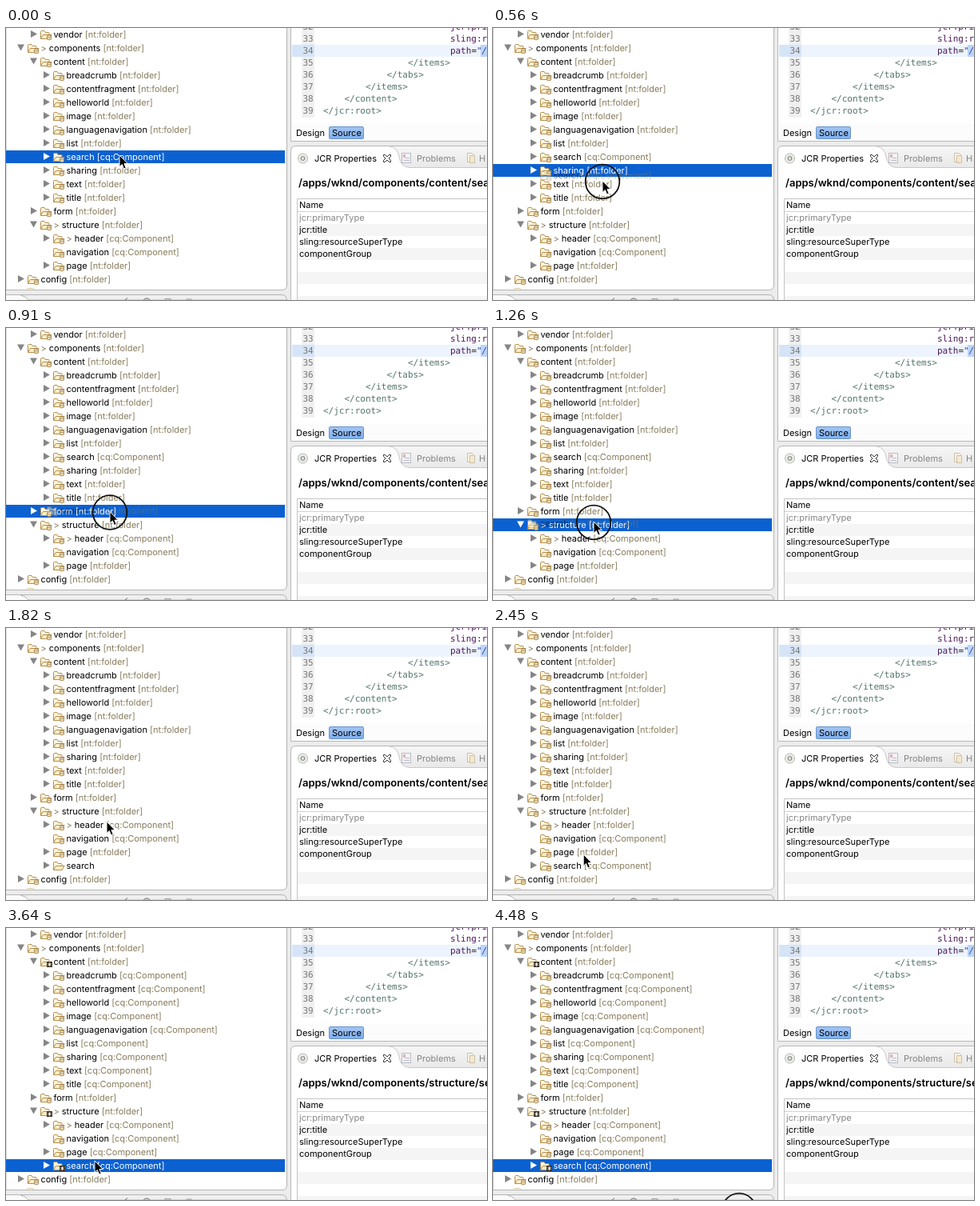
Write an HTML page that moves like this. It is 602 px wide and 340 px high and loops after 4.55 s.

```html
<!DOCTYPE html>
<html lang="en">
<head>
<meta charset="utf-8">
<title>Moving a component in the tree</title>
<style>
html, body { margin: 0; width: 100%; height: 100%; overflow: hidden; background: #ececec; }
svg { display: block; width: 602px; height: 340px; }
text { font: 11px Inter, "Open Sans", sans-serif; fill: #000; text-rendering: geometricPrecision; }
.type { fill: #877c5c; }
.on text, .on .type { fill: #fff; }
.on .arrow { fill: #fff; }
.arrow { fill: #858585; }
.code text { font: 11px "DejaVu Sans Mono", monospace; fill: #54756f; white-space: pre; }
.code .num { fill: #777; }
.code .attr { fill: #4e1a5c; }
.code .str { fill: #3347b5; font-style: italic; }
.dim { fill: #858585; }
#title { font-size: 13px; font-weight: 600; }
</style>
</head>
<body>
<svg viewBox="0 0 602 340" xmlns="http://www.w3.org/2000/svg">
  <defs>
    <linearGradient id="bar" x2="0" y2="1">
      <stop stop-color="#f6f6f6"/><stop offset="1" stop-color="#e9e9e9"/>
    </linearGradient>
    <linearGradient id="btn" x2="0" y2="1">
      <stop stop-color="#a3c5f3"/><stop offset="1" stop-color="#7dafef"/>
    </linearGradient>
    <g id="folder" stroke-width="1" stroke-linejoin="round">
      <path d="M1.5 11.5V2.500q0-1 1-1H6l1.200 2H11q1 0 1 1V6" fill="#fdf6e2" stroke="#b58f4f"/>
      <path d="M1.500 11.500L4.300 6.500H15l-2.800 5z" fill="#fceec6" stroke="#b58f4f"/>
    </g>
    <g id="store">
      <path d="M9.500 8.300v3.800q2.500 1.600 5 0V8.300z" fill="#ecd7a8" stroke="#9a7c48" stroke-width=".8"/>
      <ellipse cx="12" cy="8.300" rx="2.500" ry="1.100" fill="#fffaea" stroke="#9a7c48" stroke-width=".8"/>
    </g>
    <g id="dirty">
      <rect x="9" y="6" width="7" height="7" fill="#3a3226"/>
      <path d="M12.500 7v5M10.300 8.300l4.400 2.500M14.700 8.300l-4.400 2.500" stroke="#fff" stroke-width=".9"/>
    </g>
  </defs>

  <!-- tree panel -->
  <path d="M0 -1H351.500V321q0 6.500-6.500 6.500H0z" fill="#fff" stroke="#b5b5b5"/>
  <path d="M27 326.500v-1h6l2 1" stroke="#d8c49a" fill="none"/>
  <g id="tree"></g>

  <!-- bottom tab strip -->
  <path d="M0 333.500H345q6 0 6.500 6.500H0z" fill="#efefef" stroke="#b5b5b5"/>
  <path d="M0 334H18q7 1 10 6H0z" fill="#fafafa"/>
  <path d="M18 334q7 1 10 6" fill="none" stroke="#b5b5b5"/>
  <g fill="none" stroke="#666">
    <path d="M149 340l3-2.500"/>
    <circle cx="176" cy="343" r="5"/>
    <path d="M199 340v-1.500h7v1.500M226 340v-1h6v1" stroke="#999"/>
  </g>

  <!-- editor -->
  <path d="M356.500 -1V141.500H603V-1z" fill="#fff" stroke="#b9b9b9"/>
  <rect x="370" width="16" height="112" fill="#f0f0f0"/>
  <rect x="358" y="21" width="244" height="15" fill="#edf4fd"/>
  <rect x="358" y="21" width="28" height="15" fill="#d6e4f7"/>
  <rect x="594" y="21" width="8" height="15" fill="#bcd5f7"/>
  <g class="code" id="code"></g>
  <rect x="357" y="119" width="245" height="22" fill="#fcfcfc"/>
  <rect x="404.500" y="123.500" width="43" height="15" rx="1.500" fill="url(#btn)" stroke="#6a93c9"/>
  <text x="363" y="135">Design</text>
  <text x="408" y="135">Source</text>

  <!-- properties view -->
  <path d="M356.500 341V154q0-6.500 6.500-6.500H603V341z" fill="#fff" stroke="#b9b9b9"/>
  <path d="M480 148H602V174H504Q494 174 492 162T480 148" fill="url(#bar)"/>
  <path d="M480 148Q490 149 492 161T504 174.500H602" fill="none" stroke="#c9c9c9"/>
  <circle cx="371.500" cy="163" r="6" fill="#eceeea" stroke="#b3b7b0"/>
  <circle cx="371.500" cy="163" r="2.500" fill="#dcdfd9" stroke="#777d73"/>
  <text x="386" y="167">JCR Properties</text>
  <path d="M472.500 158.500h2l2.500 2.500 2.500-2.500h2v2l-2.500 2.500 2.500 2.500v2h-2l-2.500-2.500-2.500 2.500h-2v-2l2.500-2.500-2.500-2.500z" fill="#fff" stroke="#333"/>
  <g stroke="#a3a3b5" fill="#f4f4fa" opacity=".65">
    <rect x="495.500" y="156.500" width="11" height="12"/>
    <path d="M498 165.500h7M500 162.500h5" fill="none"/>
    <rect x="497" y="158" width="3" height="4" fill="#d89090" stroke="none"/>
    <path d="M577.500 156.500h6l2 2v9h-8z" stroke="#b9a98a" fill="#faf3e2"/>
    <path d="M580.500 159.500h6v9h-6z" stroke="#b9a98a" fill="#fbe7b8"/>
  </g>
  <text class="dim" x="514" y="167">Problems</text>
  <text class="dim" x="592" y="167">H</text>
  <text id="title" x="366" y="198"></text>
  <path d="M364.500 341V213.500H603" fill="none" stroke="#c4c4c4"/>
  <path d="M365 229.500H602" stroke="#d2d2d2"/>
  <g id="table"></g>

  <g id="ghost" opacity=".45"></g>
  <g id="pointer">
    <circle id="ring" r="21.300" fill="none" stroke="#111" stroke-width="1.800"/>
    <path d="M0 -1V13.500L3.300 10.500 5.600 16 8.200 14.900 5.900 9.600H10.300z" fill="#000" stroke="#fff" stroke-width="1" stroke-linejoin="round"/>
  </g>
</svg>
<script>
const LOOP = 4550, STEP = 70, ROW = 17;
const DRAG = 420, DROP = 1330, MOVED = 1610, TYPED = 2380, CLICK = 3220, SELECTED = 3290, SYNCED = 3430, PRESS = 4340;
const $ = id => document.getElementById(id);

// pointer path: time, x, y
const path = [
  [0, 142, 160], [350, 142, 160], [490, 142, 183], [560, 137, 192], [840, 134, 227],
  [910, 130, 230.5], [1120, 126, 243], [2100, 126, 243], [2590, 110, 294],
  [3150, 110, 294], [3290, 111, 292], [3850, 111, 292], [4270, 308, 353], [LOOP, 308, 353]
];

function pointerAt(t) {
  const i = path.findIndex(k => k[0] > t);
  const [t0, x0, y0] = path[i - 1], [t1, x1, y1] = path[i];
  let p = (t - t0) / (t1 - t0);
  if (t > 2000) p = p * p * (3 - 2 * p);
  return [x0 + (x1 - x0) * p, y0 + (y1 - y0) * p];
}

const FOLDER = "nt:folder", COMPONENT = "cq:Component";

function treeItems(t) {
  const moved = t >= MOVED, typed = t >= TYPED, synced = t >= SYNCED;
  const leaf = synced ? COMPONENT : FOLDER;
  const search = { name: "search", level: 2, type: moved && !typed ? "" : COMPONENT, dirty: synced };
  const parent = (name, level, open, dirty, mark) => ({ name, level, open, dirty, mark, type: FOLDER });
  const child = name => name === "search" ? search : { name, level: 2, type: leaf };
  const names = ["breadcrumb", "contentfragment", "helloworld", "image", "languagenavigation",
    "list", "search", "sharing", "text", "title"];
  return [
    parent("vendor", 1),
    parent("components", 0, true, false, true),
    parent("content", 1, true, synced),
    ...names.filter(n => !moved || n !== "search").map(child),
    parent("form", 1),
    parent("structure", 1, true, synced, true),
    { name: "header", level: 2, type: typed ? leaf : COMPONENT, mark: true },
    { name: "navigation", level: 2, type: COMPONENT, bare: true },
    child("page"),
    ...(moved ? [search] : []),
    parent("config", 0)
  ];
}

function label(item, y) {
  const x = 16 * item.level;
  const badge = item.dirty ? "dirty" : item.type ? "store" : "";
  const icon = id => `<use href="#${id}" x="${x + 26}" y="${y - 5.5}"/>`;
  return icon("folder") + (badge && icon(badge)) +
    `<text x="${x + 43.4}" y="${y + 4.5}">` +
    (item.mark ? '<tspan class="type">&gt; </tspan>' : "") + item.name +
    (item.type ? `<tspan class="type"> [${item.type}]</tspan>` : "") + "</text>";
}

function rowMarkup(item, i, on) {
  const y = 7.5 + ROW * i, x = 14.5 + 16 * item.level;
  const arrow = item.bare ? "" : item.open
    ? `M${x - .5} ${y - 4}h9l-4.500 8z` : `M${x + .5} ${y - 4.5}v9l8-4.500z`;
  return `<g class="${on ? "on" : ""}">` +
    (on ? `<rect y="${y - 7.5}" width="349" height="16" fill="#0c61d0"/>` : "") +
    `<path class="arrow" d="${arrow}"/>${label(item, y)}</g>`;
}

function selectedRow(t) {
  if (t >= SELECTED) return 17;
  if (t >= MOVED) return -1;
  if (t > DRAG && t < DROP) return Math.floor((pointerAt(t - STEP)[1] + 1) / ROW);
  return 9;
}

function drawStatic() {
  const code = [
    [24, '<tspan class="attr">jcr:pri</tspan>'],
    [24, '<tspan class="attr">sling:r</tspan>'],
    [24, '<tspan class="attr">path</tspan><tspan fill="#222">=</tspan><tspan class="str">"/</tspan>'],
    [16, "&lt;/items&gt;"], [12, "&lt;/tabs&gt;"], [8, "&lt;/items&gt;"],
    [4, "&lt;/content&gt;"], [0, "&lt;/jcr:root&gt;"]
  ];
  $("code").innerHTML = code.map(([col, s], i) => {
    const y = 2 + 15 * i;
    return `<text class="num" x="371.500" y="${y}">${32 + i}</text><text x="${397 + col * 6.62}" y="${y}">${s}</text>`;
  }).join("");

  const cells = ["Name", "jcr:primaryType", "jcr:title", "sling:resourceSuperType", "componentGroup", "", "", "", ""];
  $("table").innerHTML = cells.map((s, i) => {
    const y = 221 + 15 * i + (i ? 1 : 0);
    return (i && i % 2 === 0 ? `<rect x="365" y="${y - 7}" width="237" height="15" fill="#f5f5f5"/>` : "") +
      `<text x="367" y="${y + 4}" class="${i === 1 ? "dim" : ""}">${s}</text>`;
  }).join("");

  $("ghost").innerHTML = label({ name: "search", level: 2, type: COMPONENT }, 160.5);
}

let lastTree = "";
function draw(t) {
  const on = selectedRow(t);
  const tree = treeItems(t).map((item, i) => rowMarkup(item, i, i === on)).join("");
  if (tree !== lastTree) $("tree").innerHTML = lastTree = tree;

  const dragging = t >= DRAG && t < DROP;
  const [x, y] = pointerAt(t);
  const [gx, gy] = pointerAt(Math.max(0, t - STEP));
  $("pointer").setAttribute("transform", `translate(${x} ${y})`);
  $("ghost").setAttribute("transform", `translate(${gx - 142} ${gy - 160})`);
  $("ghost").style.display = dragging ? "" : "none";
  const pressed = dragging || (t >= CLICK && t < CLICK + 2 * STEP) || t >= PRESS;
  $("ring").style.display = pressed ? "" : "none";
  $("title").textContent = `/apps/wknd/components/${t >= SELECTED + STEP ? "structure" : "content"}/search`;
}

drawStatic();
const start = performance.now();
function tick() {
  const t = (performance.now() - start) % LOOP;
  draw(Math.floor(t / STEP) * STEP);
  requestAnimationFrame(tick);
}
tick();
</script>
</body>
</html>
```
